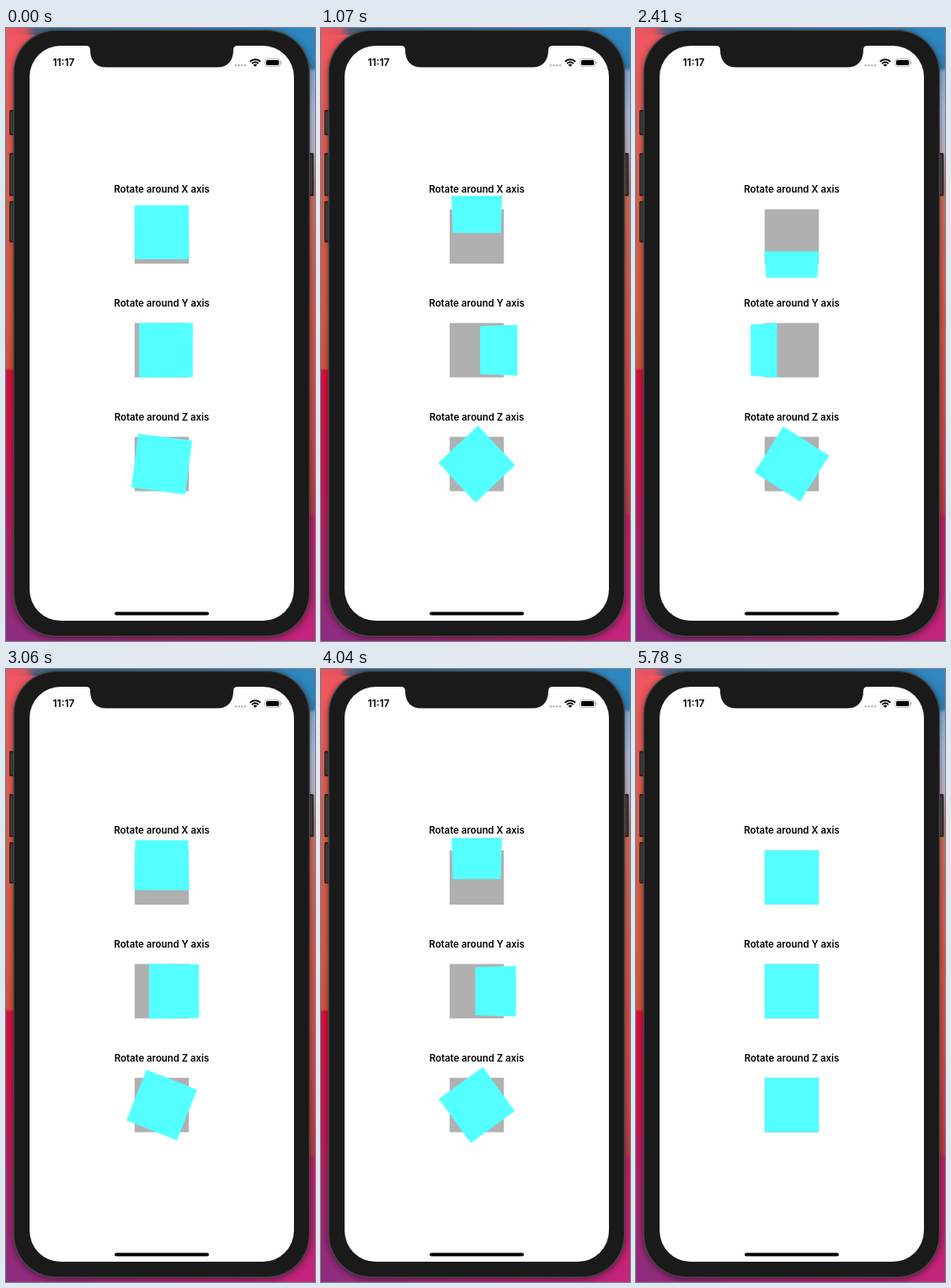
Animation of 367 by 726 pixels, one loop 5880 ms. Source, as an HTML page with a canvas:

```html
<!DOCTYPE html>
<html lang="en">
<head>
<meta charset="utf-8">
<title>Rotation axes</title>
<style>
html, body { margin: 0; width: 100%; height: 100%; overflow: hidden; background: #fff; }
canvas { display: block; width: 367px; height: 726px; }
</style>
</head>
<body>
<canvas id="stage"></canvas>
<script>
const W = 367, H = 726, LOOP = 5880;
const SIDE = 64.4, HALF = SIDE / 2;
const DEPTH = 41;    // distance from the face to the rotation axis
const CAMERA = 720;  // viewing distance
const STEP = 7.2;    // degrees per picture
const CX = 185, ROWS = [246.9, 381.6, 516.4];
const CYAN = '#54ffff', GRAY = '#b0b0b0', FONT = 'Inter, Roboto, sans-serif';

// [picture index, start time in ms]
const PACE = [[0, 0], [11, 660], [22, 1300], [33, 1940], [44, 2580], [54, 3180],
  [65, 3800], [75, 4390], [83, 4850], [86, 5030], [97, 5660], [99, 5780], [100, 5880]];

const canvas = document.getElementById('stage');
const ratio = window.devicePixelRatio || 1;

function fit(c) {
  c.width = W * ratio;
  c.height = H * ratio;
  const g = c.getContext('2d');
  g.scale(ratio, ratio);
  return g;
}

const ctx = fit(canvas);
const backdrop = document.createElement('canvas');

function box(g, x, y, w, h, r, fill) {
  g.beginPath();
  g.roundRect(x, y, w, h, r);
  g.fillStyle = fill;
  g.fill();
}

function ramp(g, x0, y0, x1, y1, stops) {
  const grad = g.createLinearGradient(x0, y0, x1, y1);
  const len = Math.hypot(x1 - x0, y1 - y0);
  for (const [at, color] of stops) grad.addColorStop(at / len, color);
  return grad;
}

function text(g, str, x, y, font, align) {
  g.font = font + ' ' + FONT;
  g.textAlign = align;
  g.fillStyle = '#000';
  g.fillText(str, x, y);
}

function drawWallpaper(g) {
  g.fillStyle = ramp(g, 0, 0, 0, H, [[0, '#ee5660'], [60, '#ec5a58'], [200, '#d9604c'],
    [330, '#dc5a44'], [403, '#d8503f'], [406, '#d80f3e'], [520, '#cb1450'], [620, '#a82468'], [H, '#8c2d80']]);
  g.fillRect(0, 0, 185, H);
  g.fillStyle = ramp(g, 0, 0, 0, H, [[0, '#2f88c2'], [47, '#2f80b8'], [52, '#8fb0dc'], [100, '#b4c2e2'],
    [145, '#c9b9c8'], [185, '#d9705c'], [350, '#e0564a'], [480, '#d94848'], [573, '#c03c48'],
    [579, '#c81f62'], [H, '#c3247c']]);
  g.fillRect(185, 0, 182, H);
  g.fillStyle = ramp(g, 0, 0, W, 0, [[0, '#ee5660'], [22, '#e0525c'], [34, '#5a5f80'], [60, '#2b6e9c'], [W, '#2f88c2']]);
  g.fillRect(0, 0, W, 8);
  g.fillStyle = ramp(g, 0, H, W, H, [[0, '#8c2d80'], [90, '#a02a7c'], [220, '#b8287a'], [W, '#c3247c']]);
  g.fillRect(0, 712, W, 14);
}

function drawPhone(g) {
  g.save();
  g.shadowColor = 'rgba(0,0,0,.5)';
  g.shadowBlur = 9 * ratio;
  g.shadowOffsetY = 2 * ratio;
  box(g, 9, 2, 352, 719, 51, '#3c3c3c');
  g.restore();
  for (const [x, y, h] of [[4, 97, 30], [4, 148, 51], [4, 205, 49], [360, 148, 51]]) {
    box(g, x, y, 5.5, h, 1.5, '#222');
    box(g, x + 1.2, y + 2, 2.6, h - 4, 1, '#3d3d3d');
  }
  box(g, 8.5, 2, 352.5, 719, 51, '#4b4b4b');
  box(g, 9.8, 3.2, 350, 716.6, 50, '#1a1a1a');
  box(g, 28, 21, 314, 681, 37, '#fefefe');

  // notch
  g.beginPath();
  g.moveTo(94, 20);
  g.lineTo(95, 21);
  g.quadraticCurveTo(100, 21, 100, 26);
  g.bezierCurveTo(100, 39, 107, 46.5, 119, 46.5);
  g.lineTo(251, 46.5);
  g.bezierCurveTo(263, 46.5, 270, 39, 270, 26);
  g.quadraticCurveTo(270, 21, 275, 21);
  g.lineTo(276, 20);
  g.fillStyle = '#1a1a1a';
  g.fill();
  box(g, 129, 691.4, 112, 4.2, 2.1, '#000');
}

function drawStatus(g) {
  text(g, '11:17', 55.5, 45.3, '600 12px', 'left');
  for (let i = 0; i < 4; i++) box(g, 271.7 + i * 3.7, 43, 2.4, 2.4, 1.2, '#b5b5b5');

  // wifi
  g.save();
  g.beginPath();
  g.moveTo(296, 46);
  g.lineTo(286, 36);
  g.lineTo(306, 36);
  g.closePath();
  g.clip();
  g.strokeStyle = '#000';
  g.lineWidth = 1.9;
  for (const r of [8.5, 5.3]) {
    g.beginPath();
    g.arc(296, 45.8, r, Math.PI, 0);
    g.stroke();
  }
  g.beginPath();
  g.arc(296, 45.8, 3.1, Math.PI, 0);
  g.fillStyle = '#000';
  g.fill();
  g.restore();

  // battery
  g.beginPath();
  g.roundRect(307.6, 36.7, 18, 8.7, 2.6);
  g.strokeStyle = '#a0a0a0';
  g.lineWidth = 0.8;
  g.stroke();
  box(g, 309, 38.1, 15.2, 5.9, 1.5, '#000');
  box(g, 326.5, 39.6, 1.1, 2.9, [0, 1, 1, 0], '#a0a0a0');
}

function drawBackdrop() {
  const g = fit(backdrop);
  drawWallpaper(g);
  drawPhone(g);
  drawStatus(g);
  ROWS.forEach((cy, i) => {
    text(g, `Rotate around ${'XYZ'[i]} axis`, CX, cy - 51.7, '600 11.4px', 'center');
    g.fillStyle = GRAY;
    g.fillRect(CX - HALF, cy - HALF, SIDE, SIDE);
  });
}

// One edge of the turned face: shift along the travel direction and half its length
function edge(side, a) {
  const z = DEPTH * (Math.cos(a) - 1) - side * Math.sin(a);
  const scale = CAMERA / (CAMERA - z);
  return [scale * (side * Math.cos(a) + DEPTH * Math.sin(a)), scale * HALF];
}

function tilted(a, place) {
  const [p, u] = edge(HALF, a), [q, v] = edge(-HALF, a);
  ctx.beginPath();
  for (const [along, across] of [[p, -u], [p, u], [q, v], [q, -v]]) ctx.lineTo(...place(along, across));
  ctx.fill();
}

function indexAt(t) {
  let k = 0;
  while (k < PACE.length - 2 && t >= PACE[k + 1][1]) k++;
  const [n0, t0] = PACE[k], [n1, t1] = PACE[k + 1];
  return Math.min(99, Math.floor(n0 + (n1 - n0) * (t - t0) / (t1 - t0) + 0.05));
}

function draw(now) {
  const a = (indexAt(now % LOOP) + 1) * STEP * Math.PI / 180;
  ctx.drawImage(backdrop, 0, 0, W, H);
  ctx.fillStyle = CYAN;
  tilted(a, (along, across) => [CX + across, ROWS[0] - along]);
  tilted(a, (along, across) => [CX + along, ROWS[1] + across]);
  ctx.save();
  ctx.translate(CX, ROWS[2]);
  ctx.rotate(a);
  ctx.fillRect(-HALF, -HALF, SIDE, SIDE);
  ctx.restore();
}

drawBackdrop();
let start = null;
function tick(now) {
  if (start === null) start = now;
  draw(now - start);
  requestAnimationFrame(tick);
}
draw(0);
requestAnimationFrame(tick);
</script>
</body>
</html>
```
